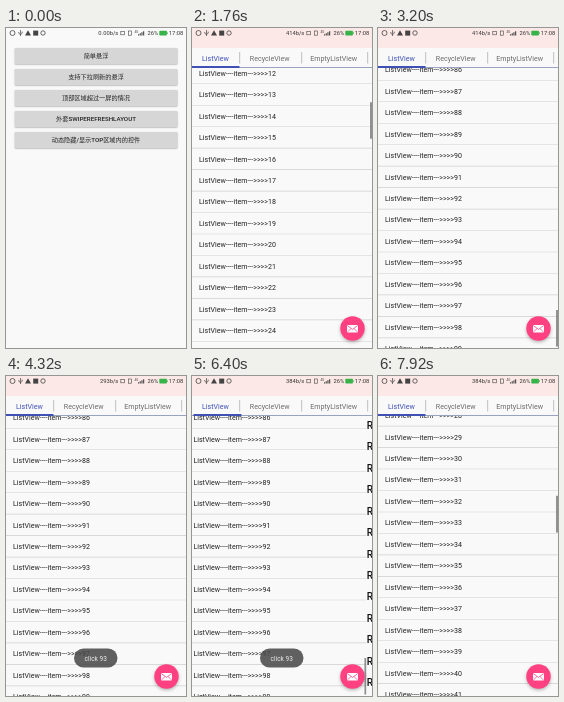
These frames come from a looping animation (180x320 px, 8000 ms). An HTML page with a canvas:

```html
<!DOCTYPE html>
<html lang="zh">
<head>
<meta charset="utf-8">
<style>
  html, body { margin: 0; width: 100%; height: 100%; overflow: hidden; background: #f9f9f9; }
  canvas { display: block; width: 180px; height: 320px; }
</style>
</head>
<body>
<canvas></canvas>
<script>
const W = 180, H = 320, LOOP = 8000, STEP = 80;
const ROW = 21.46, ITEMS = 100, HEADER = 90, LIST_TOP = 40;
const LATIN = 'Roboto, "Noto Sans CJK SC", "Noto Sans CJK", sans-serif';
const PAPER = '#f9f9f9', PINK = '#fce8e6', BLUE = '#3f51b5', INK = '#222';
const MENU = ['简单悬浮', '支持下拉刷新的悬浮', '顶部区域超过一屏的情况',
  '外套SWIPEREFRESHLAYOUT', '动态隐藏/显示TOP区域内的控件'];
// Label, left edge, width, text inset.
const TABS = [['ListView', 0, 47.5, 10], ['RecycleView', 47.5, 62, 10.3],
  ['EmptyListView', 109.5, 66, 8.8], ['ScrollView', 175.5, 58, 12]];

const canvas = document.querySelector('canvas');
const c = canvas.getContext('2d');
const scale = window.devicePixelRatio || 1;
canvas.width = W * scale;
canvas.height = H * scale;

const progress = (t, from, to) => Math.min(1, Math.max(0, (t - from) / (to - from)));
const smooth = (t, from, to) => { const u = progress(t, from, to); return u * u * (3 - 2 * u); };
// Travel with linearly changing speed; launch is the starting speed relative to the mean.
const glide = (u, launch) => launch * u + (1 - launch) * u * u;

function scrollAt(t) {
  if (t > 6520) return 1854.5 - 1242.5 * Math.pow(progress(t, 6520, 7920), 1.3);
  return -HEADER + 353 * glide(progress(t, 840, 1760), 0)
    + 1020.5 * glide(progress(t, 1760, 2560), 0.6)
    + 571 * glide(progress(t, 2560, 3200), 2);
}

const pageAt = t => smooth(t, 4640, 5060) + smooth(t, 5120, 5540)
  - smooth(t, 5592, 5980) - smooth(t, 6060, 6440);

function barAlpha(t) {
  if (t < 4000) return progress(t, 800, 900) * (1 - progress(t, 3300, 3480));
  return progress(t, 5980, 6100);
}

function rect(x, y, w, h, fill, radius = 0) {
  c.fillStyle = fill;
  c.beginPath();
  c.roundRect(x, y, w, h, radius);
  c.fill();
}

function disc(x, y, r, fill) {
  c.fillStyle = fill;
  c.beginPath();
  c.arc(x, y, r, 0, 7);
  c.fill();
}

function path(points, color, width = 0.7) {
  c.strokeStyle = color;
  c.lineWidth = width;
  c.beginPath();
  points.forEach(([x, y]) => c.lineTo(x, y));
  c.stroke();
}

function text(str, x, y, size, color = INK, align = 'left', weight = 400) {
  c.font = `${weight} ${size}px ${LATIN}`;
  c.textAlign = align;
  c.fillStyle = color;
  c.fillText(str, x, y);
}

function layer(draw, { x = 0, y = 0, alpha = 1 } = {}) {
  c.save();
  c.globalAlpha *= alpha;
  c.translate(x, y);
  draw();
  c.restore();
}

function shadow(color, blur, dy) {
  c.shadowColor = color;
  c.shadowBlur = blur * scale;
  c.shadowOffsetY = dy * scale;
}

function drawStatus(t) {
  const dark = '#444';
  const ring = (x, r) => {
    c.strokeStyle = dark;
    c.lineWidth = 0.8;
    c.beginPath();
    c.arc(x, 5, r, 0, 7);
    c.stroke();
  };
  ring(6.5, 2.5);
  path([[14.5, 2], [14.5, 8]], dark);
  path([[12.8, 4], [12.8, 5.4], [14.5, 6.6], [16.2, 5.2], [16.2, 3.6]], dark);
  c.fillStyle = dark;
  c.beginPath();
  c.moveTo(22, 2.2);
  c.lineTo(25, 7.6);
  c.lineTo(19, 7.6);
  c.fill();
  rect(27.2, 2.6, 5, 5, dark);
  ring(37, 2.2);

  const speed = t < 160 ? '0.00b/s' : t < 3520 ? '414b/s' : t < 6400 ? '293b/s' : '384b/s';
  text(speed, 112.3, 7.2, 5.8, '#333', 'right');
  c.strokeStyle = dark;
  c.lineWidth = 0.6;
  c.strokeRect(114.8, 3.4, 3.6, 3.4);
  c.strokeRect(122.6, 3, 2.8, 4.2);
  text('4G', 128.6, 5.2, 3, dark);
  for (let i = 0; i < 4; i++) rect(132 + i * 1.7, 6.2 - i, 1.1, 1.2 + i, dark);
  text('26%', 152.3, 7.2, 5.8, '#333', 'right');
  rect(153.3, 2.8, 7.6, 4.6, '#38b34a', 0.7);
  rect(160.9, 4.2, 0.8, 1.8, '#38b34a');
  text('17:08', 177.3, 7.2, 5.8, '#333', 'right');
}

function drawMenu() {
  rect(0, 0, W, H, PAPER);
  MENU.forEach((label, i) => {
    const y = 20 + i * 21;
    layer(() => {
      shadow('rgba(0,0,0,.3)', 1.3, 0.6);
      rect(8.8, y, 162.6, 16.2, '#d6d6d6', 0.7);
    });
    text(label, 90, y + 10.3, 6.2, INK, 'center', 500);
  });
}

function drawList(t, scroll) {
  const first = Math.max(0, Math.floor(scroll / ROW));
  for (let i = first; i < ITEMS; i++) {
    const y = LIST_TOP + i * ROW - scroll;
    if (y > H) break;
    const pressed = i === 93 ? progress(t, 3880, 4000) * (1 - progress(t, 4080, 4300)) : 0;
    if (pressed) rect(0, y, W, ROW, `rgba(0,0,0,${0.13 * pressed})`);
    text(`ListView----item--->>>>${i}`, 7, y + 13.2, 7.05);
    rect(0, y + ROW - 0.5, W, 0.6, '#cfcfcf');
  }
  const view = H - LIST_TOP, ratio = view / (ITEMS * ROW);
  rect(178, LIST_TOP + scroll * ratio, 2, view * ratio, `rgba(110,110,110,${0.75 * barAlpha(t)})`);
}

function drawRecycler() {
  for (let i = 0; i < 14; i++) {
    text(`RecycleView----item--->>>>${i}`, 0.3, 52.8 + i * 21.46, 10, '#111', 'left', 500);
  }
}

function drawEmpty() {
  rect(76, 155, 29, 29, '#26a69a', 2);
  text('空的界面', 90, 206.5, 9.7, '#777', 'center');
}

function drawTabs(page) {
  const i = Math.floor(page), part = page - i;
  const [, left, width] = TABS[i], next = TABS[i + 1];
  const lineX = left + (next[1] - left) * part;
  const lineW = width + (next[2] - width) * part;
  rect(0, 20, W, 20, PAPER);
  rect(0, 39.2, W, 0.8, '#7787ad');
  layer(() => {
    TABS.forEach(([label, x, w, pad], n) => {
      text(label, x + pad, 32.5, 7.1, n === Math.round(page) ? BLUE : '#6b6b6b');
      rect(x + w, 24, 0.6, 11.5, '#999');
    });
    rect(lineX, 37.9, lineW, 2.1, BLUE);
  }, { x: -Math.max(0, lineX - 61.5) });
}

function drawFab() {
  layer(() => {
    shadow('rgba(0,0,0,.28)', 3.5, 1.5);
    disc(160.5, 300.5, 12.2, '#ff4081');
  });
  rect(155, 296.9, 11, 7.6, '#fff', 0.8);
  path([[155.4, 297.6], [160.5, 301.4], [165.6, 297.6]], '#ff4081', 0.8);
  path([[155.4, 304], [159, 300.6]], '#ff4081', 0.7);
  path([[165.6, 304], [162, 300.6]], '#ff4081', 0.7);
}

function drawToast(t) {
  const alpha = progress(t, 4080, 4300) * (1 - progress(t, 6440, 6680));
  if (!alpha) return;
  layer(() => {
    rect(68, 272.5, 43.5, 19, 'rgba(72,72,72,.86)', 9.5);
    text('click 93', 89.7, 284.5, 6.5, '#eee', 'center');
  }, { alpha });
}

function drawPager(t) {
  const scroll = scrollAt(t), page = pageAt(t);
  const header = Math.max(0, -scroll);
  rect(0, 0, W, H, PAPER);
  rect(0, 0, W, 20 + header, PINK);
  layer(() => {
    const pages = [() => drawList(t, Math.max(0, scroll)), drawRecycler, drawEmpty];
    pages.forEach((draw, i) => {
      if (Math.abs(i - page) >= 1) return;
      layer(() => {
        c.beginPath();
        c.rect(0, LIST_TOP, W, H);
        c.clip();
        draw();
      }, { x: (i - page) * W });
    });
    drawTabs(page);
  }, { y: header });
  drawFab();
}

function render(now) {
  const t = Math.floor(now % LOOP / STEP) * STEP;
  c.setTransform(scale, 0, 0, scale, 0, 0);
  drawMenu();
  const opened = progress(t, 400, 720);
  if (opened) {
    const ease = 1 - (1 - opened) ** 2;
    layer(() => drawPager(t), { y: 26 * (1 - ease), alpha: ease });
  }
  drawStatus(t);
  drawToast(t);
}

const start = performance.now();
function tick() {
  render(performance.now() - start);
  requestAnimationFrame(tick);
}
tick();
</script>
</body>
</html>
```
